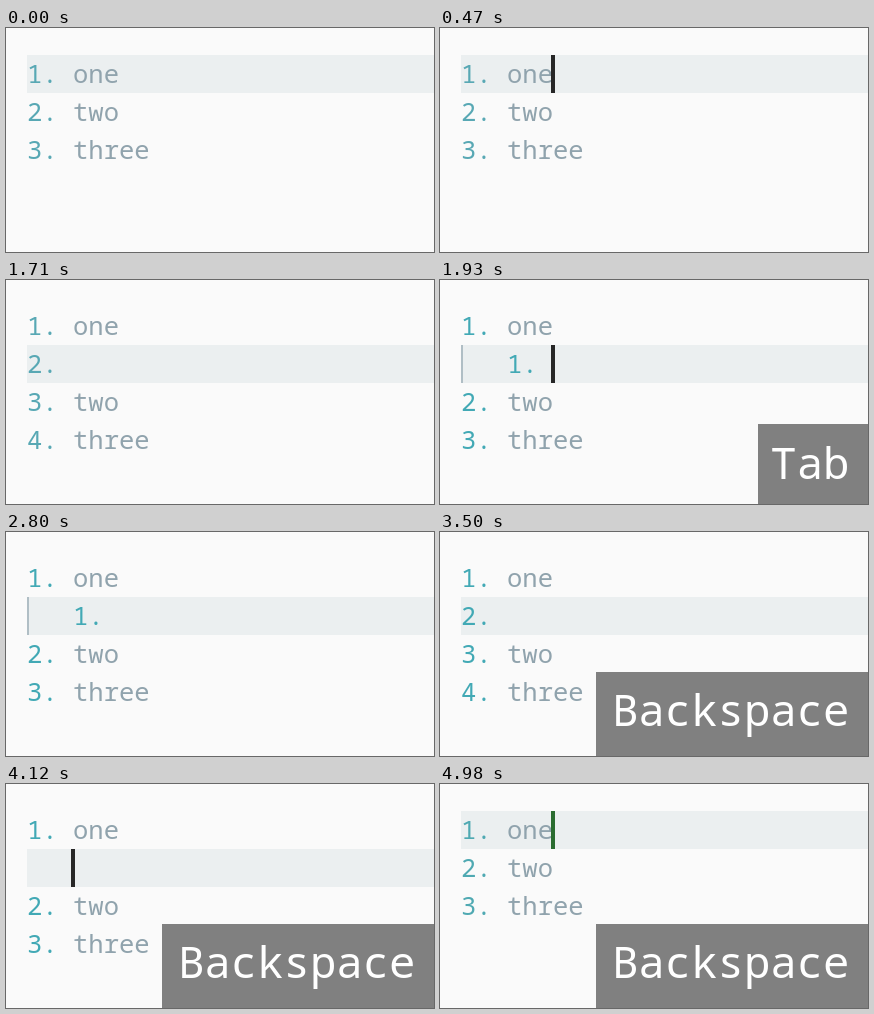
Recreate the animation shown at these times as an HTML page with a canvas. Size 428x224 px, loop 5530 ms.

```html
<!DOCTYPE html>
<html lang="en">
<head>
<meta charset="utf-8">
<title>List editing</title>
<style>
  html, body { margin: 0; width: 100%; height: 100%; overflow: hidden; background: #fafafa; }
  canvas { display: block; }
</style>
</head>
<body>
<canvas id="stage" width="428" height="224"></canvas>
<script>
const ctx = document.getElementById('stage').getContext('2d');
const LOOP = 5530;
const WIDTH = 428, HEIGHT = 224;
const LEFT = 21, TOP = 27, ROW = 38, COL = 46 / 3;
const FONT = '"Noto Sans Mono", "DejaVu Sans Mono", monospace';
const SOFT_TEAL = '#58a8b4', TEAL = '#42a9b5';

const short = ['1. one', '2. two', '3. three'];
const withItem = ['1. one', '2. ', '3. two', '4. three'];
const nested = ['1. one', '   1. ', '2. two', '3. three'];
const blank = ['1. one', '   ', '2. two', '3. three'];

// Each step overrides part of the editor state from its time on.
const steps = [
  { at: 0, lines: short, row: 0, col: 6, caret: false, key: '', marker: SOFT_TEAL, caretColor: '#272727' },
  { at: 470, caret: true },
  { at: 790, lines: withItem, row: 1, col: 3, key: 'Enter' },
  { at: 1250, caret: false },
  { at: 1710, key: '' },
  { at: 1790, caret: true },
  { at: 1860, lines: ['1. one', '   2. ', '3. two', '4. three'], col: 6, key: 'Tab' },
  { at: 1930, lines: nested, marker: TEAL },
  { at: 2400, caret: false },
  { at: 2800, key: '' },
  { at: 2870, caret: true },
  { at: 2970, lines: ['1. one', '1. ', '2. two', '3. three'], col: 3, key: 'Backspace' },
  { at: 3040, lines: withItem },
  { at: 3500, caret: false },
  { at: 3880, key: '' },
  { at: 3970, caret: true },
  { at: 4120, lines: blank, key: 'Backspace' },
  { at: 4430, caret: false },
  { at: 4580, caret: true, col: 0 },
  { at: 4980, lines: short, row: 0, col: 6, marker: '#4fa9b2', caretColor: '#2a6c30' }
];

const stateAt = time => Object.assign({}, ...steps.filter(step => step.at <= time));

function rect(color, x, y, w, h) {
  ctx.fillStyle = color;
  ctx.fillRect(x, y, w, h);
}

function drawLine(line, row, markerColor) {
  const [, indent, marker, text] = line.match(/^(\s*)(\d+\.)?\s*(.*)$/);
  const baseline = TOP + row * ROW + 28;
  const put = (part, col, color) => {
    ctx.fillStyle = color;
    ctx.fillText(part, LEFT + col * COL, baseline);
  };
  ctx.textAlign = 'left';
  if (marker) {
    ctx.font = `500 25.55px ${FONT}`;
    put(marker, indent.length, markerColor);
    if (indent) rect('#b0bec5', LEFT, TOP + row * ROW, 2, ROW);
  }
  ctx.font = `25.55px ${FONT}`;
  put(text, indent.length + 3, '#90a3ad');
}

function drawKey(key) {
  const descends = key.includes('p');
  const left = WIDTH - 29 - 27 * key.length;
  const top = descends ? 140 : 144;
  rect('#808080', left, top, WIDTH - left, HEIGHT - top);
  ctx.font = `44px ${FONT}`;
  ctx.textAlign = 'right';
  ctx.fillStyle = '#fff';
  ctx.fillText(key, 409.5, descends ? 194 : 199);
}

function draw(time) {
  const { lines, row, col, caret, key, marker, caretColor } = stateAt(time);
  const y = TOP + row * ROW;
  rect('#fafafa', 0, 0, WIDTH, HEIGHT);
  rect('#ebeff0', LEFT, y, WIDTH - LEFT, ROW);
  lines.forEach((line, i) => drawLine(line, i, marker));
  if (caret) rect(caretColor, Math.max(LEFT, Math.round(LEFT + col * COL) - 2), y, 4, ROW);
  if (key) drawKey(key);
}

const start = performance.now();
function tick() {
  draw((performance.now() - start) % LOOP);
  requestAnimationFrame(tick);
}
tick();
</script>
</body>
</html>
```
